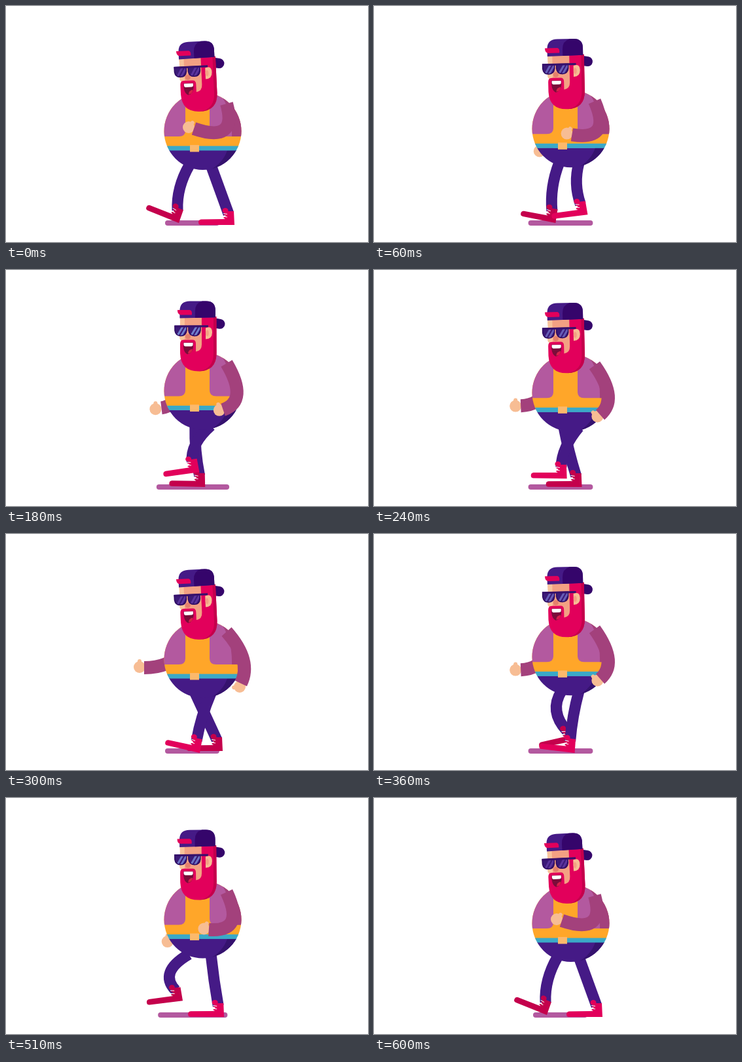
Write an HTML page with a canvas that moves like this. It is 553 px wide and 360 px high and loops after 0.63 s.

```html
<!DOCTYPE html>
<html lang="en">
<head>
<meta charset="utf-8">
<title>Walk cycle</title>
<style>
html, body { margin: 0; width: 100%; height: 100%; overflow: hidden; background: #fff; }
canvas { display: block; }
</style>
</head>
<body>
<canvas id="stage" width="553" height="360"></canvas>
<script>
const ctx = document.getElementById('stage').getContext('2d');
const LOOP = 630, CYCLE = 600, STEP = 30;
const { PI, sin, cos, abs, sqrt } = Math;

const C = {
  mauve: '#b3599f', sleeve: '#a3417c', orange: '#ffa629', belt: '#3aa9c8',
  pants: '#451a86', shade: '#35126e', navy: '#35056b', red: '#e2005b',
  deep: '#c4004c', skin: '#f7bd94', blush: '#f3a183', buckle: '#fbb96c'
};

// Heel lands at `front`, slides back by `stride`, then swings forward again
const FAR = { front: 264, stride: 67, dip: 0, ground: 331, tilt: 22, bend: 36, color: C.deep };
const NEAR = { front: 296, stride: 53, dip: 10, ground: 334, tilt: 13, bend: 15, color: C.red };

function shape(d, color) {
  ctx.fillStyle = color;
  ctx.fill(new Path2D(d));
}
function line(d, color, width, cap = 'butt') {
  ctx.strokeStyle = color;
  ctx.lineWidth = width;
  ctx.lineCap = cap;
  ctx.stroke(new Path2D(d));
}
function rect(x, y, w, h, color) {
  ctx.fillStyle = color;
  ctx.fillRect(x, y, w, h);
}
function oval(x, y, rx, ry, color) {
  ctx.fillStyle = color;
  ctx.beginPath();
  ctx.ellipse(x, y, rx, ry, 0, 0, 2 * PI);
  ctx.fill();
}
function group(draw) {
  ctx.save();
  draw();
  ctx.restore();
}

function stance(f, u) {
  return {
    x: f.front + f.stride * u,
    y: f.ground,
    deg: f.tilt * (1 - u) ** 3,
    bend: f.bend * 0.3 * (1 - u)
  };
}
function swing(f, u) {
  const arc = sin(PI * u);
  return {
    x: f.front + f.stride * (1 - u) ** 2 - f.dip * arc * arc,
    y: f.ground - 27 * arc,
    deg: f.tilt * (u * u - arc),
    bend: f.bend * (arc + 0.3 * u)
  };
}

function leg(f, phase, hx, hy) {
  const u = phase * 2 % 1;
  const { x, y, deg, bend } = phase < 0.5 ? stance(f, u) : swing(f, u);
  const r = deg * PI / 180;
  const ax = x - 9 * cos(r) + 17 * sin(r), ay = y - 9 * sin(r) - 17 * cos(r);
  line(`M${hx} ${hy}Q${(hx + ax) / 2 - bend} ${(hy + ay) / 2} ${ax} ${ay}`, C.pants, 17);
  group(() => {
    ctx.translate(x, y);
    ctx.rotate(r);
    oval(-14, -22, 4.5, 4, f.color);
    shape('M-1 -21H-16L-14 -18L-17 -16L-13 -14L-17 -11L-14 -9L-51 -8.5Q-55 -8 -55 -4Q-55 0 -51 0H0Z', f.color);
    line('M-17 -17.5L-11 -16.5M-17 -13L-11 -12', '#fff', 1);
  });
}

function arm(shoulder, elbow, cuff, hand, thumb) {
  const [x, y] = hand;
  line(`M${x} ${y}l${9 * cos(thumb)} ${9 * sin(thumb)}`, C.skin, 6, 'round');
  oval(x, y, 9, 9, C.skin);
  line(`M${shoulder}Q${elbow} ${x + cuff[0]} ${y + cuff[1]}`, C.sleeve, 20);
}

// s runs from 0 to 1 and back as the arms swing
function farArm(s) {
  arm([268, 180], [268 - 18 * s, 214 - 10 * s], [12 - 5 * s, 7 * s - 6],
    [265 - 61 * s, 226 - 23 * s], -PI / 2);
}
function nearArm(s, d) {
  const q = s * s;
  arm([337, 142 + d], [354 + 22 * sqrt(s), 210 - 17 * s], [8 - 6 * q, 2 - 7 * q],
    [279 + 78 * s, 185 + 48 * s], -0.87 - 2.4 * q);
}

function shadow(d) {
  line(`M${233 + 2 * d} 331H${338 - 2.3 * d}`, C.mauve, 8, 'round');
}

function torso() {
  const ball = new Path2D();
  ball.arc(300.5, 184, 59, 0, 2 * PI);
  ctx.clip(ball);
  rect(240, 120, 122, 90, C.orange);
  shape('M240 120H274V183Q274 192 264 192H240Z', C.mauve);
  shape('M362 120H311V183Q311 192 321 192H362Z', C.mauve);
  shape('M362 120V192H345Q346 150 325 125Z', C.sleeve);
  rect(240, 213, 122, 32, C.pants);
  shape('M362 213H338Q332 232 312 243H362Z', C.shade);
  rect(240, 206.5, 122, 7, C.belt);
  rect(281, 205, 14, 10.5, C.buckle);
}

function lens(x, tint) {
  const path = new Path2D(`M${x} 85h18v7q-1 8 -9 8t-9 -8z`);
  ctx.fillStyle = '#3b1a78';
  ctx.fill(path);
  group(() => {
    ctx.clip(path);
    line(`M${x + 3} 101l9 -15M${x + 9} 101l9 -15`, tint, 3);
  });
  ctx.strokeStyle = '#2d0a60';
  ctx.lineWidth = 1.5;
  ctx.stroke(path);
}

function head(low) {
  // Cap tail, face
  line('M316 80L327 82', C.navy, 15, 'round');
  shape('M266 70H303V126H268Z', C.blush);
  shape('M266 70H273V106H266Q264 100 266 94Z', '#f9c49c');
  oval(278, 101, 4, 4, '#e4816c');

  // Hair, beard, ear
  shape('M299 71H321.5V127Q321 154 294 154Q267 154 266 127V112Q266 106 272 106H285Q290 106 290 112V124Q299 123 299 113Z', C.red);
  shape('M317 71H321.5V127Q321 154 294 154Q317 151 317 127Z', C.deep);
  shape('M305 88Q315 84 315 95Q315 105 305 105Z', C.skin);
  oval(307.5, 96, 2.5, 4.5, C.blush);

  // Mouth
  shape('M271 110H286V117Q285 127 277 128Q272 126 271 117Z', '#7a0d3a');
  shape('M278 127Q278 121 285 120Q284 127 278 127Z', '#d81f4a');
  shape('M271.5 110.5H285.5V114Q285 116 283 116H274Q272 116 271.5 114Z', '#fff');

  // Sunglasses lose their shine as the head dips
  const tint = `rgb(${112 - low * 22},${132 - low * 80},${207 - low * 50})`;
  lens(258, tint);
  lens(279, tint);
  line('M257.5 85.5H309', '#35106c', 3);

  // Cap
  shape('M265.5 73V61Q266 47 281 47H306Q320 47 320 61V72Z', C.pants);
  shape('M289 72.5V62Q289 50 300 47H306Q320 47 320 61V72Z', C.navy);
  shape('M262 60.5H281Q285 61.5 284 68H267Q262 67.5 262 60.5Z', C.red);
}

function draw(t) {
  const p = t / CYCLE;
  const s = 1 - abs(1 - 2 * p);
  const low = 1 - abs(sin(2 * PI * p)) ** 1.2;
  const d = 7 * low, hipY = 237 + 0.85 * d;
  ctx.clearRect(0, 0, 553, 360);
  shadow(d);
  farArm(s);
  leg(FAR, p, 284.5 - 5.5 * cos(2 * PI * p + 0.6), hipY);
  leg(NEAR, (p + 0.5) % 1, 313, hipY);
  group(() => {
    ctx.translate(0, d);
    torso();
  });
  nearArm(s, d);
  group(() => {
    ctx.translate(295, 105 + d);
    ctx.rotate(-low * 0.047);
    ctx.translate(-295, -105);
    head(low);
  });
}

// The pose changes in hard steps and rests for one extra step at the end
const start = performance.now();
function tick() {
  const t = (performance.now() - start) % LOOP;
  draw(Math.floor(t / STEP) * STEP % CYCLE);
  requestAnimationFrame(tick);
}
tick();
</script>
</body>
</html>
```
